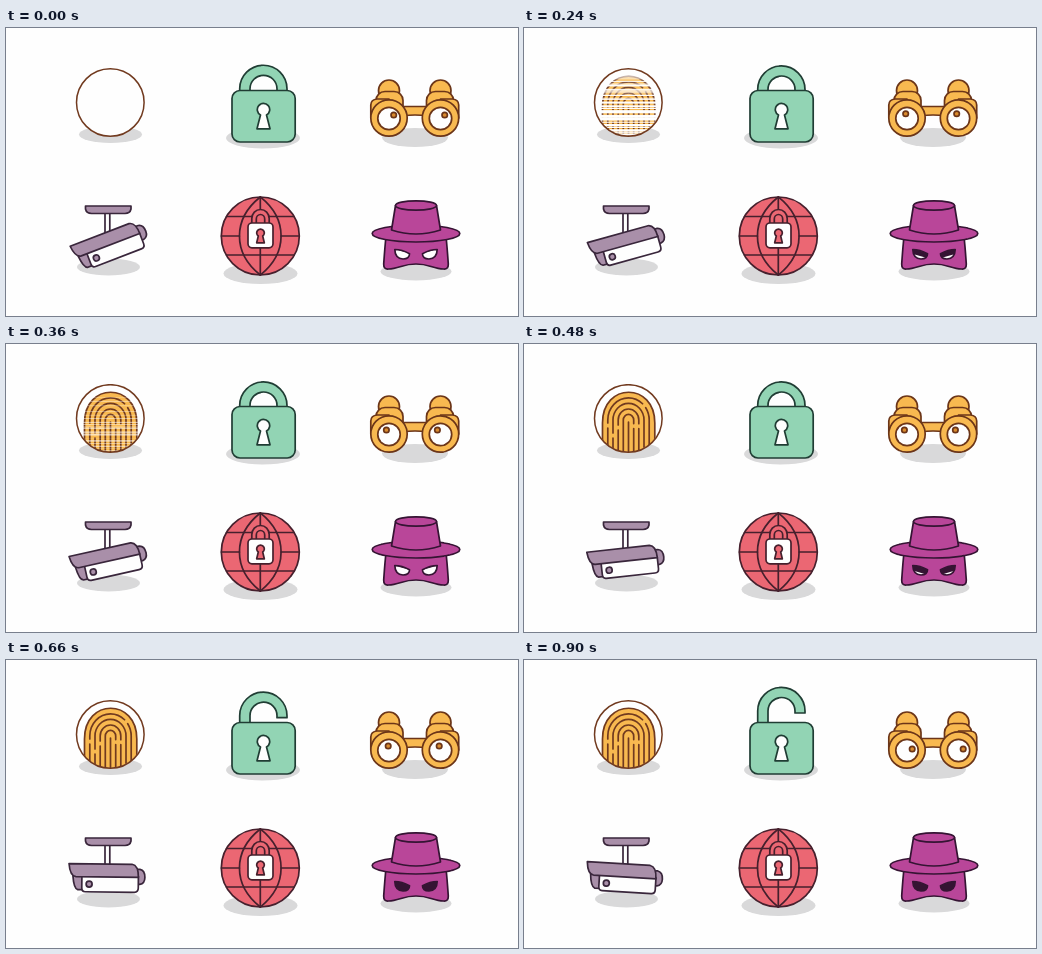
Recreate the animation shown at these times as an HTML page. Size 512 by 288 pixels, loop 960 ms.

```html
<!DOCTYPE html>
<html lang="en">
<head>
<meta charset="utf-8">
<title>Security icons</title>
<style>
  html, body { margin: 0; width: 100%; height: 100%; overflow: hidden; background: #fefefe; }
  svg { display: block; width: 512px; height: 288px; }
  .art { stroke-width: 1.7; stroke-linejoin: round; stroke-linecap: round; }
  .white { fill: #fefefe; }
</style>
</head>
<body>
<svg viewBox="0 0 512 288">
  <defs>
    <clipPath id="disc"><circle cx="104.3" cy="74.5" r="33.5"/></clipPath>
    <mask id="scan" maskUnits="userSpaceOnUse" x="70" y="40" width="70" height="70"><g id="rows"></g></mask>
    <path id="eye" d="M388.800 221.500 Q396 221.500 403.500 225.800 Q403.500 231 397 231 Q389 230.500 388.800 221.500Z"/>
    <clipPath id="eyeClip"><use href="#eye"/></clipPath>
    <g id="barrel">
      <circle cx="383" cy="62.500" r="10.500"/>
      <rect x="370" y="63.500" width="27" height="26" rx="9"/>
      <path d="M364.800 90 V77 Q365 71.500 371 71 H383 V90Z"/>
      <circle cx="383" cy="90" r="18.200"/>
      <circle cx="383" cy="90.500" r="11.200" class="white"/>
    </g>
  </defs>

  <g fill="#d9d9da">
    <ellipse cx="104.500" cy="106.500" rx="31.500" ry="8.500"/>
    <ellipse cx="257" cy="110" rx="37" ry="10.500"/>
    <ellipse cx="409" cy="109.500" rx="33" ry="9.500"/>
    <ellipse cx="102.500" cy="239" rx="31.500" ry="8.500"/>
    <ellipse cx="254.500" cy="245.500" rx="37" ry="10.500"/>
    <ellipse cx="410" cy="243.500" rx="35.500" ry="9"/>
  </g>

  <g class="art" stroke="#713a1f">
    <circle cx="104.3" cy="74.5" r="33.8" class="white" stroke="none"/>
    <g mask="url(#scan)">
      <g clip-path="url(#disc)">
        <path d="M78.500 110 V79 C78.500 38 130.800 38 130.800 79 V110" fill="#f8b950"/>
        <g id="ridges" fill="none"></g>
      </g>
    </g>
    <circle cx="104.3" cy="74.5" r="33.8" fill="none" stroke-width="1.5"/>
  </g>

  <g class="art" stroke="#203d34" fill="#92d4b4">
    <path id="shackle" d="M233.700 80 V61.500 A23.600 23.500 0 0 1 281 61.500 V63.500 H271 V61.500 A13.500 13.500 0 0 0 244 61.500 V80Z"/>
    <rect x="226" y="62.500" width="63.200" height="51.500" rx="8"/>
    <path class="white" d="M254.500 87 A6.200 6.200 0 1 1 260.500 87 L264 100.800 H251Z"/>
  </g>

  <g class="art" stroke="#6b3518" fill="#f8b950">
    <path d="M397 78.500 H421 V88 Q409 86 397 88Z"/>
    <use href="#barrel"/>
    <use href="#barrel" transform="translate(817.500 0) scale(-1 1)"/>
    <g id="pupils" fill="#d98b2f">
      <circle cx="383" cy="90" r="2.700"/>
      <circle cx="434" cy="90" r="2.700"/>
    </g>
  </g>

  <g class="art" stroke="#39263b" fill="#a98fa9">
    <rect x="99" y="184" width="4.800" height="24" class="white"/>
    <path d="M79.500 178 H125 V181 Q124 185.500 119 185.500 H85.500 Q80.500 185.500 79.500 181Z"/>
    <g id="camera">
      <path d="M131 209 H134 Q139 210 139 217 Q139 223 134 224 H131Z"/>
      <path d="M67 216 H78 V230 H72 Q68 229 67 216Z"/>
      <path class="white" d="M76 216 H132.500 V228 Q132.500 232 128.500 232 H79.500 Q76 232 76 228Z"/>
      <path d="M63 204 H126 Q132.500 205 132.500 217 H70 Q64 216.500 63 204Z"/>
      <circle cx="83.300" cy="224.300" r="3"/>
    </g>
  </g>

  <g class="art" stroke="#46202d" fill="#eb6773">
    <circle cx="254.3" cy="208" r="39"/>
    <path fill="none" d="M254.300 169 V182 M254.300 219 V247 M215.500 208 H233.500 M275 208 H293 M220.500 188.500 H288 M220.500 227 H288"/>
    <path fill="none" d="M254.300 169 C226.500 191 226.500 225 254.300 247 C282 225 282 191 254.300 169"/>
    <path d="M245.800 199 V190.500 A8.700 9 0 0 1 263.200 190.500 V199Z"/>
    <path d="M250.300 195 V191 A4.200 4.500 0 0 1 258.700 191 V195"/>
    <rect x="242" y="195" width="25" height="24.800" rx="4" class="white"/>
    <path d="M252.300 208 A3.800 3.800 0 1 1 256.700 208 L258.300 214.800 H250.700Z"/>
  </g>

  <g class="art" stroke="#351433" fill="#b94699">
    <path d="M380 209 Q379 217 377.700 236 Q377.500 241.500 382.500 241 Q387 241 395 238.500 Q410 233.500 425 238.500 Q433 241 437.500 241 Q442.500 241.500 442.300 236 Q441 217 440 209Z"/>
    <g id="leftEye">
      <use href="#eye" class="white"/>
      <g clip-path="url(#eyeClip)">
        <rect id="lid" x="387" y="219.500" width="22" height="0" transform="rotate(16 388 221)" fill="#351433" stroke="none"/>
      </g>
    </g>
    <use href="#leftEye" transform="translate(820 0) scale(-1 1)"/>
    <ellipse cx="410" cy="205.500" rx="43.800" ry="8.500"/>
    <path d="M389.500 177.500 L385.500 202 Q410 210 434.500 202 L430.500 177.500Z"/>
    <ellipse cx="410" cy="177.500" rx="20.500" ry="4.700"/>
  </g>
</svg>
<script>
const LOOP = 960, STEP = 60, TOP = 47, ROWS = 63;
const $ = id => document.getElementById(id);

function svg(tag, attrs, parent) {
  const el = document.createElementNS('http://www.w3.org/2000/svg', tag);
  for (const k in attrs) el.setAttribute(k, attrs[k]);
  return parent.appendChild(el);
}

// Linear interpolation through [time, value] pairs
function track(keys, t) {
  for (let i = 1; i < keys.length; i++) {
    const [t0, a] = keys[i - 1], [t1, b] = keys[i];
    if (t <= t1) return a + (b - a) * Math.max(0, t - t0) / (t1 - t0);
  }
  return keys[keys.length - 1][1];
}

let seed = 11;
const random = () => (seed = seed * 16807 % 2147483647) / 2147483647;
for (let i = 0; i < 5; i++) random();

// Nested arches: radius and dash pattern
[
  [20.7, '24 5 52 5 40'],
  [15.5, '14 5 90'],
  [10.3, '22 5 42 5 30'],
  [5.2, '52 5 40']
].forEach(([r, dash]) => svg('path', {
  d: `M${104.5 - r} 108V76A${r} ${r * 1.07} 0 0 1 ${104.5 + r} 76V108`,
  'stroke-dasharray': dash
}, $('ridges')));
svg('path', { d: 'M104.500 78V108' }, $('ridges'));

const rows = Array.from({ length: ROWS }, (_, i) => ({
  start: 50 + 240 * random(),
  el: svg('rect', { x: 70, y: TOP + i, width: 70, height: 1.02, fill: '#fff' }, $('rows'))
}));

const tracks = {
  rise: [[0, -0.7], [120, 0], [480, 0], [540, -1], [600, -4], [780, -9.5], [900, -10.5]],
  lookX: [[0, 4.7], [120, 0.8], [240, -1.3], [360, -2.6], [600, -2.6], [780, 2.8], [900, 5.2]],
  lookY: [[0, -3], [120, -4.5], [360, -4], [600, -4], [780, -4], [900, -1]],
  tilt: [[0, -21], [120, -19], [240, -15.5], [360, -12.5], [600, 0], [780, 2], [900, 3.5]],
  lid: [[0, 1.5], [120, 6.5], [240, 6], [360, 2], [420, 2], [600, 16]]
};

function draw(now) {
  const t = Math.floor(now % LOOP / STEP) * STEP;
  const at = name => track(tracks[name], t);
  const set = (id, value) => $(id).setAttribute('transform', value);

  for (const row of rows) {
    row.el.setAttribute('opacity', Math.min(1, Math.max(0, (t - row.start) / 180)));
  }
  set('shackle', `translate(0 ${at('rise')})`);
  set('pupils', `translate(${at('lookX')} ${at('lookY')})`);
  set('camera', `rotate(${at('tilt')} 102 208)`);
  $('lid').setAttribute('height', at('lid'));
}

const begin = performance.now();
function tick() {
  draw(performance.now() - begin);
  requestAnimationFrame(tick);
}
tick();
</script>
</body>
</html>
```
